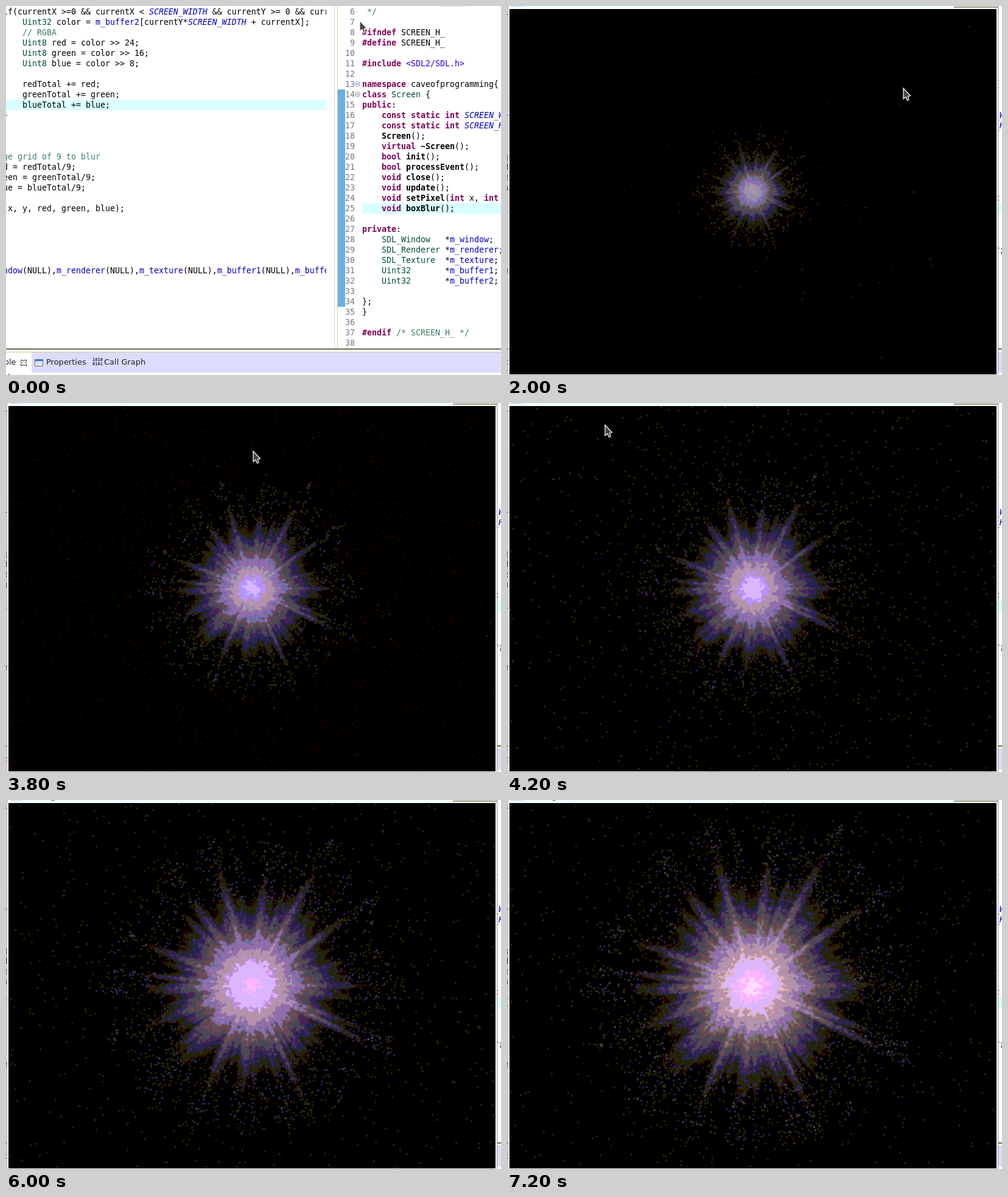
Animation, 813 px wide and 606 px high, one loop 7.3 s. Source, as an HTML page with a canvas:

```html
<!DOCTYPE html>
<html lang="en">
<head>
<meta charset="utf-8">
<title>Particle burst</title>
<style>
html, body { margin: 0; width: 100%; height: 100%; overflow: hidden; background: #fff; }
#stage { position: relative; width: 813px; height: 606px; overflow: hidden; background: #fff; }
#stage div, #stage svg, canvas { position: absolute; }
pre { position: absolute; margin: 0; font: 13.29px/17px "DejaVu Sans Mono", monospace; color: #000; }
pre b { color: #7f0055; }
pre u { color: #0000c0; text-decoration: none; }
pre i { color: #0000c0; }
pre s { color: #005032; text-decoration: none; }
pre em { color: #3f7f5f; font-style: normal; }
.row { height: 17px; background: #d9ffff; }
#left { left: 0; top: 0; width: 526px; height: 562px; overflow: hidden; }
#nums { left: 541px; top: 1px; width: 32px; text-align: right; color: #787878; }
#ruler { left: 545px; top: 137px; width: 12px; height: 357px;
  background: repeating-conic-gradient(#2c8fd8 0 25%, #a5d3f2 0 50%) 0 0 / 2px 2px; }
#tabs { left: 0; top: 563px; width: 813px; height: 43px; background: #fff; font: 13px/16px "DejaVu Sans", sans-serif; color: #222; }
#tabs div { white-space: pre; }
#win { left: 1px; top: 0; width: 806px; height: 606px; background: #fff; visibility: hidden; }
canvas { left: 3px; top: 5px; }
</style>
</head>
<body>
<div id="stage">
  <div id="left">
    <div class="row" style="left:0;top:154px;width:526px"></div>
<pre style="left:-5px;top:1px">if(currentX &gt;=0 &amp;&amp; currentX &lt; <i>SCREEN_WIDTH</i> &amp;&amp; currentY &gt;= 0 &amp;&amp; currentY
    <s>Uint32</s> color = <u>m_buffer2</u>[currentY*<i>SCREEN_WIDTH</i> + currentX];
    <em>// RGBA</em>
    <s>Uint8</s> red = color &gt;&gt; 24;
    <s>Uint8</s> green = color &gt;&gt; 16;
    <s>Uint8</s> blue = color &gt;&gt; 8;

    redTotal += red;
    greenTotal += green;
    blueTotal += blue;
}



<em>ge grid of 9 to blur</em>
d = redTotal/9;
een = greenTotal/9;
ue = blueTotal/9;

(x, y, red, green, blue);





<u>ndow</u>(NULL),<u>m_renderer</u>(NULL),<u>m_texture</u>(NULL),<u>m_buffer1</u>(NULL),<u>m_buffer2</u>(NULL)</pre>
  </div>
  <div style="left:539px;top:0;width:1px;height:562px;background:#d4d4d4"></div>
  <div style="left:544px;top:0;width:1px;height:562px;background:#cfcb95"></div>
  <div id="ruler"></div>
  <div class="row" style="left:585px;top:324px;width:228px"></div>
  <pre id="nums"></pre>
<pre style="left:585px;top:1px"> <em>*/</em>

<b>#ifndef</b> SCREEN_H_
<b>#define</b> SCREEN_H_

<b>#include</b> <span style="color:#2a00ff">&lt;SDL2/SDL.h&gt;</span>

<b>namespace</b> caveofprogramming{
<b>class</b> <s>Screen</s> {
<b>public</b>:
    <b>const static int</b> <i>SCREEN_WIDTH</i>
    <b>const static int</b> <i>SCREEN_HEIGHT</i>
    <strong>Screen</strong>();
    <b>virtual</b> <strong>~Screen</strong>();
    <b>bool</b> <strong>init</strong>();
    <b>bool</b> <strong>processEvent</strong>();
    <b>void</b> <strong>close</strong>();
    <b>void</b> <strong>update</strong>();
    <b>void</b> <strong>setPixel</strong>(<b>int</b> x, <b>int</b> y
    <b>void</b> <strong>boxBlur</strong>();

<b>private</b>:
    <s>SDL_Window</s>   *<u>m_window</u>;
    <s>SDL_Renderer</s> *<u>m_renderer</u>;
    <s>SDL_Texture</s>  *<u>m_texture</u>;
    <s>Uint32</s>       *<u>m_buffer1</u>;
    <s>Uint32</s>       *<u>m_buffer2</u>;

};
}

<b>#endif</b> <em>/* SCREEN_H_ */</em>
</pre>
  <svg width="813" height="170" style="left:0;top:0" fill="none">
    <path d="M713 0H762" stroke="#f0a080" stroke-dasharray="2 2"/>
    <g stroke="#8c9cc4" fill="#eef2fc"><circle cx="577.5" cy="128" r="3.8"/><circle cx="577.5" cy="145" r="3.8"/></g>
    <path d="M575.5 128h4M575.5 145h4" stroke="#5a6ca0"/>
  </svg>
  <div id="tabs">
    <div style="left:0;top:-1px;width:813px;height:1px;background:#cfcb95"></div>
    <div style="left:0;top:0;width:813px;height:1px;background:#111"></div>
    <div style="left:0;top:5px;width:813px;height:1px;background:#cfcb95"></div>
    <div style="left:42px;top:6px;width:771px;height:33px;background:#dcdcff"></div>
    <div style="left:-35px;top:14px">Console</div>
    <div style="left:66px;top:14px">Properties</div>
    <div style="left:161px;top:14px">Call Graph</div>
    <div style="left:142px;top:15px;font:bold 7px/7px 'DejaVu Sans Mono',monospace;color:#234">1010
0101</div>
    <div style="left:4px;top:41px;width:2px;height:2px;background:#777"></div>
    <svg width="70" height="40" style="left:0;top:0" fill="none">
      <path d="M24.5 18.5h3l1.500 2 1.500-2h3v2.500l-2 2 2 2v2.500h-3l-1.500-2-1.500 2h-3v-2.500l2-2-2-2z" stroke="#333"/>
      <path d="M47.500 17.500h13v11h-13z" fill="#fff" stroke="#5a6c9c"/>
      <path d="M48 19h12" stroke="#4a78c0" stroke-width="3"/>
      <path d="M48 23.500h12M48 26h12M52.500 21v7" stroke="#c4cce0"/>
    </svg>
  </div>
  <div id="win">
    <div style="left:0;top:0;width:1px;height:606px;background:#8a8a8a"></div>
    <div style="left:805px;top:0;width:1px;height:606px;background:#8f8f80"></div>
    <div style="left:1px;top:0;width:735px;height:5px;background:#f4ffff"></div>
    <div style="left:6px;top:0;width:19px;height:1px;background:#c4d0ff"></div>
    <div style="left:733px;top:0;width:72px;height:3px;background:#c6c8b6;border-bottom:1px solid #83857a;box-sizing:border-box"></div>
    <div id="mark" style="left:74px;top:0;width:4px;height:1px;background:#444"></div>
    <canvas id="view" width="800" height="600"></canvas>
  </div>
  <svg id="arrow" width="20" height="26" viewBox="-2 -2 20 26" style="left:-2px;top:-2px">
    <path d="M0 0V17.500L4 14.500 6.500 20 9 19 7.500 13.500 11.500 12.500Z" fill="#46464c" stroke="#fff" stroke-width="1.2"/>
  </svg>
</div>
<script>
const W = 800, H = 600, CX = 399, CY = 299, LOOP = 7300, START = 400;
const $ = id => document.getElementById(id);
$('nums').textContent = Array.from({ length: 33 }, (_, i) => i + 6).join('\n');

let seed = 20177;
const rnd = () => {
  seed = (seed + 0x6D2B79F5) | 0;
  let z = Math.imul(seed ^ (seed >>> 15), 1 | seed);
  z ^= z + Math.imul(z ^ (z >>> 7), 61 | z);
  return ((z ^ (z >>> 14)) >>> 0) / 4294967296;
};

// Periodic value noise over one turn, u in 0..1
const ring = n => {
  const k = Float32Array.from({ length: n }, rnd);
  return u => {
    const p = u * n, i = Math.floor(p), f = p - i;
    return k[i % n] * (1 - f) + k[(i + 1) % n] * f;
  };
};
const wide = ring(89), fine = ring(211);

// Main spokes in degrees, clockwise from the right
const spokes = [0, 27, 66, 95, 114, 138, 158, 185, 200, 235, 254, 278, 289, 299, 324];
const rayTable = Float32Array.from({ length: 1440 }, (_, i) => {
  const u = i / 1440;
  let v = 0.18 * wide(u) ** 2 + 0.16 * fine(u) ** 3 - 0.14;
  for (const s of spokes) {
    const gap = (u * 360 - s + 540) % 360 - 180;
    v += 0.24 * Math.exp(-((gap / 2.4) ** 2));
  }
  return v;
});
const rayAt = a => rayTable[Math.floor((a / (2 * Math.PI) + 1) * 1440) % 1440];

const radius = new Float32Array(W * H), ray = new Float32Array(W * H);
for (let y = 0, i = 0; y < H; y++) {
  for (let x = 0; x < W; x++, i++) {
    radius[i] = Math.hypot(x - CX, y - CY);
    ray[i] = rayAt(Math.atan2(y - CY, x - CX));
  }
}

const grain = Float32Array.from({ length: 65536 }, rnd);
const blotch = (x, y) => {
  const i = Math.floor(x), j = Math.floor(y), f = x - i, g = y - j;
  const at = (a, b) => grain[((b & 255) << 8) | (a & 255)];
  const top = at(i, j) * (1 - f) + at(i + 1, j) * f;
  const low = at(i, j + 1) * (1 - f) + at(i + 1, j + 1) * f;
  return top * (1 - g) + low * g - 0.5;
};

// Free sparks fly at constant speed, some relaunch; trail sparks fringe the halo along the rays
const sparks = Array.from({ length: 5000 }, () => ({ a: rnd() * 2 * Math.PI, v: 576 * rnd() ** 2, again: rnd() < 0.15 }));
const trails = Array.from({ length: 3900 }, () => {
  let a;
  do a = rnd() * 2 * Math.PI; while (rnd() > 0.3 + 2 * rayAt(a));
  return { a, d: (0.8 + rnd() ** 1.5) * (1 + 0.5 * rayAt(a)), w: 0.6 + 1.2 * rnd() };
});

const ctx = $('view').getContext('2d');
const image = ctx.createImageData(W, H);
const pixels = new Uint32Array(image.data.buffer);
const dots = new Float32Array(W * H);

function dot(a, d, w) {
  const x = Math.round(CX + Math.cos(a) * d), y = Math.round(CY + Math.sin(a) * d);
  if (x < 1 || y < 1 || x > W - 2 || y > H - 2) return;
  for (let j = -1; j < 2; j++) {
    for (let i = -1; i < 2; i++) dots[(y + j) * W + x + i] += w;
  }
}

// Colours snap to 8 levels of red and green, 4 of blue
const snap = (v, n) => Math.round(Math.round(Math.min(255, v) * n / 255) * 255 / n);

function drawBurst(e) {
  pixels.fill(0xff000000);
  if (e > 0) {
    const halo = 200 * (1 - Math.exp(-e / 5.1));
    const tone = k => 129.28 * (1 + Math.sin(k * e));
    const red = tone(0.183), green = tone(0.09), blue = tone(0.27);
    const drift = Math.round(e * 10) * 37;
    dots.fill(0);
    for (const s of sparks) dot(s.a, s.again ? s.v * e % 500 : s.v * e, 1);
    const count = Math.min(trails.length, 180 * e ** 1.6);
    for (let i = 0; i < count; i++) dot(trails[i].a, trails[i].d * halo, trails[i].w);

    for (let i = 0; i < pixels.length; i++) {
      const q = radius[i] / halo;
      let f = 0;
      if (q < 2.4) {
        const p = q / (1 + ray[i] * Math.min(1.3, 0.4 + 0.7 * q)) / 0.71;
        f = Math.exp(-p * p);
        if (f > 0.01) {
          const n = blotch((i % W) / 4 + drift, Math.floor(i / W) / 4 + drift * 3);
          f *= 1 + n * Math.min(0.8, q * 0.6);
        }
      }
      if (!dots[i] && f < 0.05) continue;
      // Sparks barely lift the parts that already glow
      const lift = Math.min(3, dots[i]) / 9 * Math.max(0.25, 1 - 4 * f);
      const m = Math.min(1, f + (1 - f) * lift);
      const r = snap(Math.floor(red * m), 7), g = snap(Math.floor(green * m), 7), b = snap(Math.floor(blue * m), 3);
      pixels[i] = (0xff000000 | (b << 16) | (g << 8) | r) >>> 0;
    }
  }
  ctx.putImageData(image, 0, 0);
}

const late = [4300, 4500, 4600, 4800, 5000, 5100, 5300, 5400, 5600, 6000, 6200, 6400, 6600, 6900, 7200];
function held(t) {
  if (t < 300) return 0;
  if (t >= 2400 && t < 3400) return 2400;
  if (t < 4300) return Math.floor(t / 100) * 100;
  return late.filter(k => k <= t).pop();
}

const path = [[0, 581, 24], [200, 581, 24], [1000, 651, 135], [2000, 651, 135], [2400, 651, 122], [3400, 651, 122],
  [4200, 161, 36], [4800, 90, -10], [5000, 72, -14], [5400, 72, -15], [5600, 72, -40], [LOOP, 72, -40]];
function pointer(t) {
  const i = path.findIndex(p => p[0] > t);
  const a = path[i - 1], b = path[i], k = (t - a[0]) / (b[0] - a[0]);
  return [1, 2].map(n => Math.round(a[n] + (b[n] - a[n]) * k));
}

let shown = -1;
function frame() {
  const t = held(performance.now() % LOOP);
  if (t !== shown) {
    shown = t;
    $('win').style.visibility = t ? 'visible' : 'hidden';
    $('mark').style.opacity = t >= 5600 ? 1 : 0;
    const [x, y] = pointer(t);
    $('arrow').style.transform = `translate(${x}px, ${y}px)`;
    if (t) drawBurst((t - START) / 1000);
  }
  requestAnimationFrame(frame);
}
frame();
</script>
</body>
</html>
```
